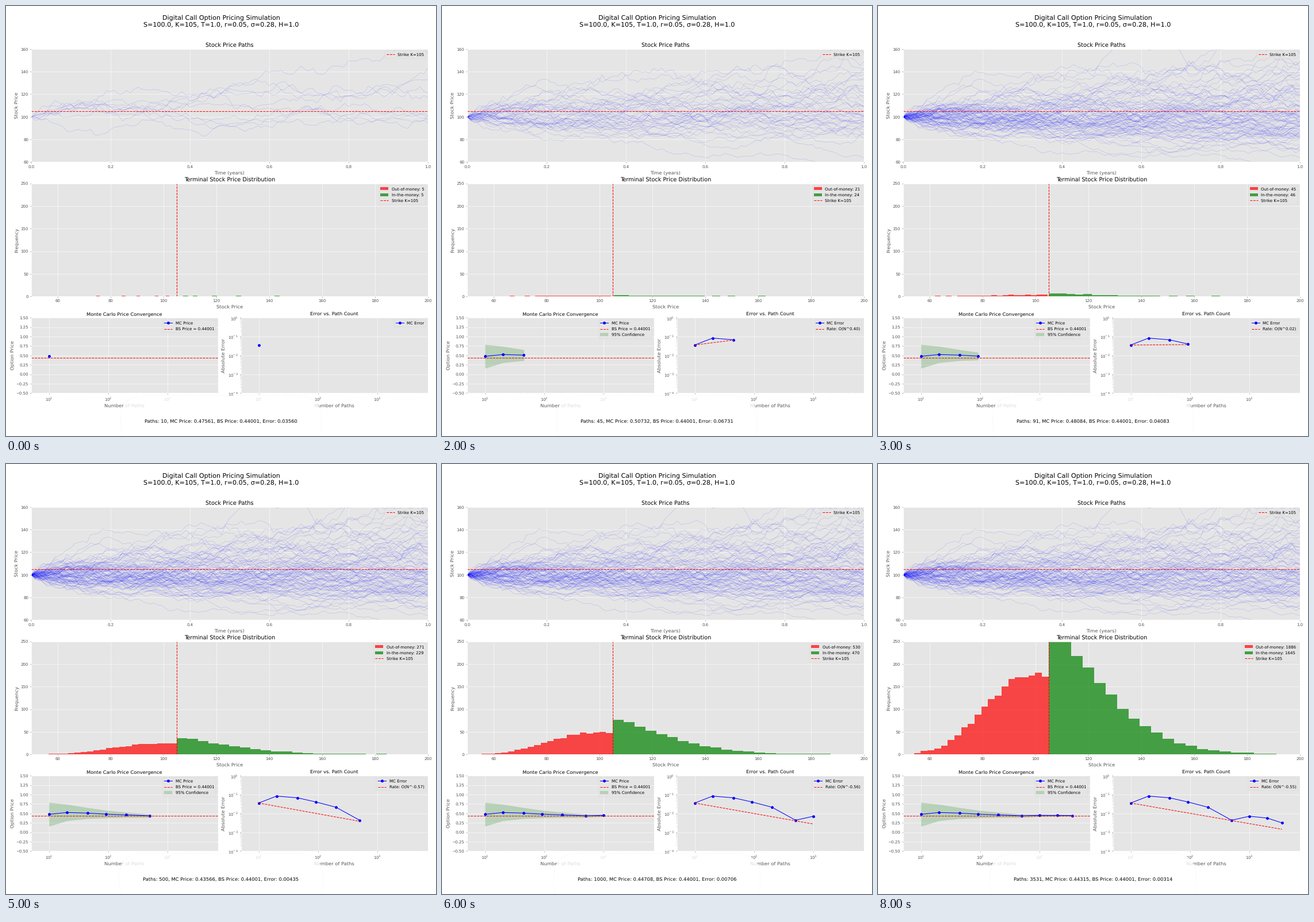
These frames come from a looping animation (748x748 px, 9000 ms). A matplotlib script:

```python
import numpy as np
import matplotlib.pyplot as plt
from matplotlib.animation import FuncAnimation

plt.style.use("ggplot")
plt.rcParams["font.family"] = "DejaVu Sans"
plt.rcParams["text.hinting"] = "none"

SIZE, DPI = 748, 50
START, STRIKE, BS_PRICE = 100, 105, 0.440014
DISCOUNT = np.exp(-0.05)
MEDIAN, SPREAD = 103, 0.2
COUNTS = np.array([10, 20, 45, 91, 200, 500, 1000, 2000, 3531])
WINS = np.array([5, 11, 24, 46, 97, 229, 470, 937, 1645])
SHOWN, STEPS = 100, 100

# Prices halfway and at expiry for the first ten paths
KNOTS = [(127, 156), (125, 143), (115, 133), (122, 121), (127, 117),
         (110, 101), (99, 101), (94, 98), (91, 97), (92, 95)]

rng = np.random.default_rng(7)
times = np.linspace(0, 1, STEPS + 1)


def make_paths():
    """Random walks in log price; the first ones are bent through their knots."""
    steps = rng.normal(0, SPREAD / np.sqrt(STEPS), (SHOWN, STEPS))
    walks = np.hstack([np.zeros((SHOWN, 1)), steps.cumsum(axis=1)])
    walks += np.log(START) + times * np.log(MEDIAN / START)
    knot_times = [0, 0.5, 1]
    for walk, knots in zip(walks, KNOTS):
        shift = np.log([START, *knots]) - np.interp(knot_times, times, walk)
        walk += np.interp(times, knot_times, shift)
    return np.exp(walks)


paths = make_paths()
pool = MEDIAN * np.exp(SPREAD * rng.normal(size=40000))
pool = pool[(pool > 53.6) & (pool < 196)]
losing, winning = pool[pool < STRIKE], pool[pool >= STRIKE]

share = WINS / COUNTS
prices = DISCOUNT * share
errors = np.abs(prices - BS_PRICE)
margins = 1.96 * DISCOUNT * np.sqrt(share * (1 - share) / (COUNTS - 1))

fig = plt.figure(figsize=(SIZE / DPI, SIZE / DPI), dpi=DPI)


def add_panel(left, top, right, bottom):
    return fig.add_axes([left / SIZE, 1 - bottom / SIZE,
                         (right - left) / SIZE, (bottom - top) / SIZE])


ax_paths = add_panel(43.8, 74.9, 733.8, 271.4)
ax_hist = add_panel(43.8, 308.7, 733.8, 505.2)
ax_price = add_panel(43.8, 542.3, 368.8, 673.3)
ax_error = add_panel(408.5, 542.3, 733.8, 673.3)

fig.suptitle("Digital Call Option Pricing Simulation\n"
             "S=100.0, K=105, T=1.0, r=0.05, σ=0.28, H=1.0",
             fontsize=16, y=0.98, linespacing=1.27)
status = fig.text(0.5, 0.03, "", ha="center", fontsize=12,
                  bbox=dict(boxstyle="round,pad=5", facecolor="white", alpha=0.8))


def finish(ax, title, xlabel, ylabel, size, **limits):
    ax.set(**limits)
    ax.set_title(title, fontsize=size)
    ax.set_xlabel(xlabel)
    ax.set_ylabel(ylabel)
    ax.legend(loc="upper right", fontsize=10)


def draw_paths(n):
    ax = ax_paths
    ax.clear()
    ax.plot(times, paths[:n].T, color="blue", lw=0.5, alpha=0.3)
    ax.axhline(STRIKE, color="red", ls="--", label=f"Strike K={STRIKE}")
    finish(ax, "Stock Price Paths", "Time (years)", "Stock Price", 14,
           xlim=(0, 1), ylim=(60, 160))


def draw_bars(group, n, color, name):
    """Histogram of n values spread evenly over the group's quantiles."""
    values = np.quantile(group, (np.arange(n) + 0.5) / n)
    ax_hist.hist(values, bins=20, color=color, alpha=0.7, label=f"{name}: {n}")


def draw_hist(losses, wins):
    ax = ax_hist
    ax.clear()
    draw_bars(losing, losses, "red", "Out-of-money")
    draw_bars(winning, wins, "green", "In-the-money")
    ax.axvline(STRIKE, color="red", ls="--", label=f"Strike K={STRIKE}")
    finish(ax, "Terminal Stock Price Distribution", "Stock Price", "Frequency", 14,
           xlim=(50, 200), ylim=(0, 250), xticks=range(60, 201, 20))


def draw_price(k):
    ax = ax_price
    ax.clear()
    n, p, m = COUNTS[:k], prices[:k], margins[:k]
    ax.plot(n, p, "bo-", label="MC Price")
    ax.axhline(BS_PRICE, color="red", ls="--", label=f"BS Price = {BS_PRICE:.5f}")
    if k > 1:
        ax.fill_between(n, p - m, p + m, color="green", alpha=0.2,
                        label="95% Confidence")
    ax.set_xscale("log")
    finish(ax, "Monte Carlo Price Convergence", "Number of Paths", "Option Price", 12,
           xlim=(5, 2 * COUNTS[-1]), ylim=(-0.5, 1.5),
           yticks=np.arange(-0.5, 1.51, 0.25))


def draw_error(k):
    ax = ax_error
    ax.clear()
    n, e = COUNTS[:k], errors[:k]
    ax.plot(n, e, "bo-", label="MC Error")
    if k > 1:
        rate = np.polyfit(np.log(n), np.log(e), 1)[0]
        ax.plot(n, e[0] * (n / n[0]) ** rate, "r--", label=f"Rate: O(N^{rate:.2f})")
    ax.set_xscale("log")
    ax.set_yscale("log")
    finish(ax, "Error vs. Path Count", "Number of Paths", "Absolute Error", 12,
           xlim=(5, 2 * COUNTS[-1]), ylim=(1e-4, 1))


def update(i):
    draw_paths(COUNTS[i])
    draw_hist(COUNTS[i] - WINS[i], WINS[i])
    draw_price(i + 1)
    draw_error(i + 1)
    status.set_text(f"Paths: {COUNTS[i]}, MC Price: {prices[i]:.5f}, "
                    f"BS Price: {BS_PRICE:.5f}, Error: {errors[i]:.5f}")
    return []


anim = FuncAnimation(fig, update, frames=len(COUNTS), interval=1000,
                     init_func=lambda: update(0), repeat=True, repeat_delay=0)
plt.show()
```
